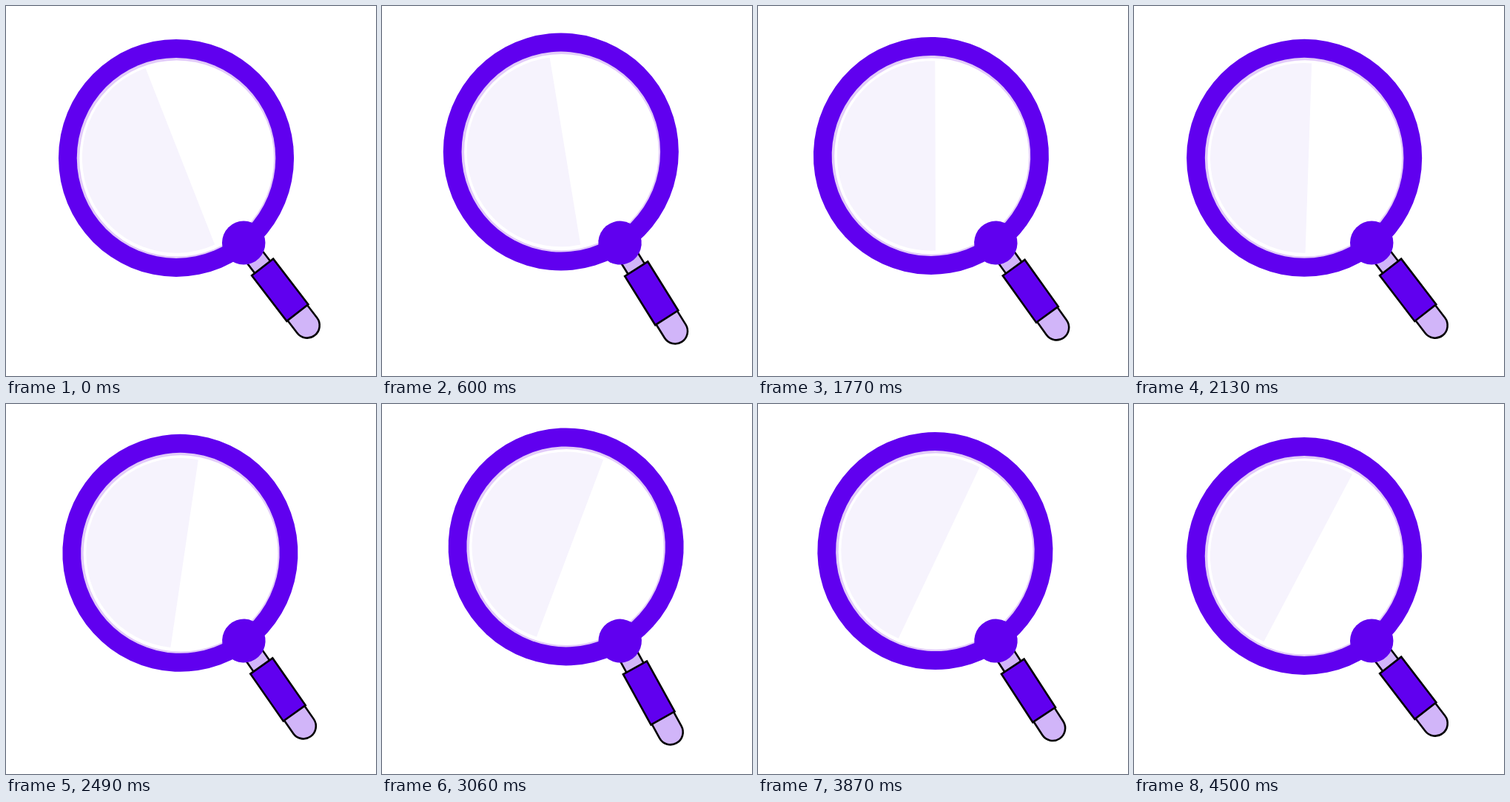
An HTML page with a canvas that plays this animation: 500x500 px, repeating every 4.53 s.

```html
<!DOCTYPE html>
<html lang="en">
<head>
<meta charset="utf-8">
<title>Magnifying glass</title>
<style>
html, body { margin: 0; width: 100%; height: 100%; overflow: hidden; background: #fff; }
canvas { display: block; width: 500px; height: 500px; }
</style>
</head>
<body>
<canvas id="stage" width="500" height="500"></canvas>
<script>
const ctx = document.getElementById('stage').getContext('2d');
const LOOP = 4530, STEP = 30, RAD = Math.PI / 180;
const PURPLE = '#6000ef', LILAC = '#d1b5f9', RIM = '#e2cbf9', GLARE = '#f6f3fd';
const SWING = 9.1;
const SWING_KEYS = [0, 1050, 2080, 3225, 4500]; // alternates rest and full swing
const LENS = { x: -92.2, y: -117.9 };
const GRIP = { x: 49.3, y: 60.45 };

function swingAngle(t) {
  for (let i = 0; i < SWING_KEYS.length - 1; i++) {
    const from = SWING_KEYS[i], to = SWING_KEYS[i + 1];
    if (t < to) {
      const eased = (1 - Math.cos(Math.PI * (t - from) / (to - from))) / 2;
      return SWING * (i % 2 ? 1 - eased : eased);
    }
  }
  return 0;
}

function disc(x, y, r, color) {
  ctx.beginPath();
  ctx.arc(x, y, r, 0, 2 * Math.PI);
  ctx.fillStyle = color;
  ctx.fill();
}

function outlined(color) {
  ctx.fillStyle = color;
  ctx.fill();
  ctx.stroke();
}

function drawLens(t, swing) {
  ctx.save();
  ctx.translate(LENS.x, LENS.y);
  disc(0, 0, 160.5, PURPLE);
  disc(0, 0, 135.5, RIM);
  ctx.rotate(-swing);
  disc(0.7, 0.6, 132.6, '#fff');

  // The glare turns steadily on top of the swing
  ctx.rotate(swing + (-21.6 + 50 * t / LOOP) * RAD);
  const cut = Math.acos(5.8 / 128.3);
  ctx.beginPath();
  ctx.arc(0, 0, 128.3, cut, 2 * Math.PI - cut);
  ctx.closePath();
  ctx.fillStyle = GLARE;
  ctx.fill();
  ctx.restore();
}

function drawHandle() {
  ctx.save();
  ctx.translate(GRIP.x, GRIP.y);
  ctx.rotate(-37.7 * RAD);
  ctx.strokeStyle = '#000';
  ctx.lineWidth = 2.6;

  ctx.beginPath();
  ctx.rect(-13.3, -70, 26.6, 32);
  outlined(LILAC);

  ctx.beginPath();
  ctx.moveTo(17, 38);
  ctx.lineTo(17, 60.5);
  ctx.arc(0, 60.5, 17, 0, Math.PI);
  ctx.lineTo(-17, 38);
  outlined(LILAC);

  ctx.beginPath();
  ctx.rect(-18.5, -39, 37, 78);
  outlined(PURPLE);
  ctx.restore();
}

function draw(now) {
  const t = Math.floor((now % LOOP) / STEP) * STEP;
  const swing = swingAngle(t) * RAD;
  ctx.fillStyle = '#fff';
  ctx.fillRect(0, 0, 500, 500);
  ctx.save();
  ctx.translate(321.4, 323.3);
  ctx.scale(0.991, 1);
  ctx.rotate(swing);
  drawLens(t, swing);
  drawHandle();
  disc(-0.2, -3.2, 29.5, PURPLE);
  ctx.restore();
}

let start;
function tick(now) {
  start ??= now;
  draw(now - start);
  requestAnimationFrame(tick);
}
draw(0);
requestAnimationFrame(tick);
</script>
</body>
</html>
```
